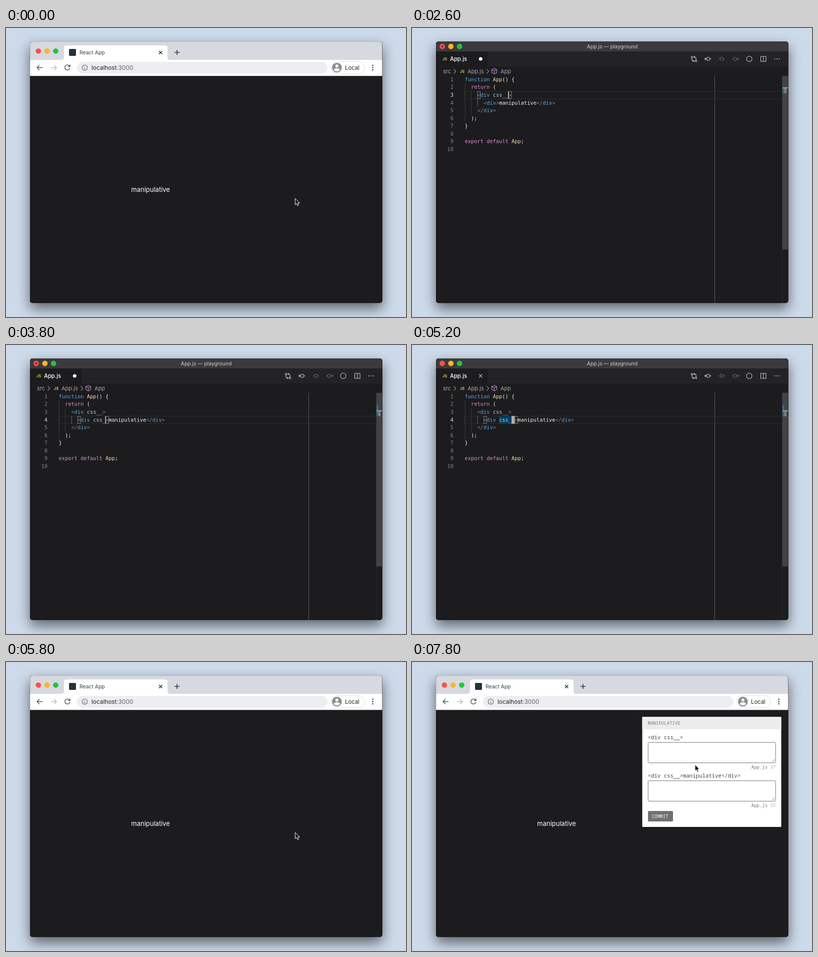
These frames come from a looping animation (800 by 580 pixels, 8000 ms). An HTML page:

```html
<!DOCTYPE html>
<html lang="en">
<head>
<meta charset="utf-8">
<title>Editor and browser</title>
<style>
html, body { margin: 0; width: 100%; height: 100%; overflow: hidden; background: #cddaea; }
svg { display: block; }
text { font-family: Inter, "Open Sans", sans-serif; white-space: pre; }
.code text { font: 10.36px "DejaVu Sans Mono", monospace; }
.panel text { font: 10.67px "Noto Sans Mono", "DejaVu Sans Mono", monospace; }
.panel .small { font-size: 8.6px; letter-spacing: .3px; }
.icon { fill: none; stroke-width: 1.1; }
.shadow { filter: drop-shadow(0 11px 13px rgba(0, 0, 0, .55)); }
.k { fill: #56a8ea; } .p { fill: #d78fd6; } .y { fill: #efdfae; }
.g { fill: #858585; } .a { fill: #9cdcfe; } .w { fill: #f0f0f0; }
</style>
</head>
<body>
<svg width="800" height="580" viewBox="0 0 800 580">
  <defs>
    <clipPath id="frame"><rect x="48" y="27" width="704.5" height="525" rx="5"/></clipPath>
  </defs>
  <rect width="800" height="580" fill="#cddaea"/>
  <rect class="shadow" x="48" y="27" width="704.5" height="525" rx="5" fill="#1c1b1d"/>
  <g clip-path="url(#frame)">
    <rect x="48" y="27" width="705" height="525" fill="#1c1b1d"/>

    <g id="browser">
      <rect x="48" y="27" width="705" height="37" fill="#d6d9df"/>
      <rect x="48" y="64" width="705" height="32" fill="#fff"/>
      <path d="M110 64q6 0 6-6V40q0-5 5-5H318q5 0 5 5V58q0 6 6 6z" fill="#fff"/>
      <g id="browserLights"></g>
      <rect x="126" y="42" width="14" height="14" rx="2" fill="#24333d"/>
      <text x="147" y="52.8" font-size="10.4" fill="#3c4043">React App</text>
      <g class="icon" stroke="#34373a" style="stroke-width:1.5">
        <path d="M306 46l6.4 6.4M312.400 46l-6.400 6.400M342 44v10M337 49h10"/>
        <path d="M73 79.500H62.500M67 74.500l-5 5 5 5" stroke="#55585c"/>
        <path d="M90 79.500h10.500M96 74.500l5 5-5 5" stroke="#b9bbbe"/>
        <path d="M127 76.500a5 5 0 1 0 .7 4M128 73.500v4h-4" stroke="#55585c"/>
      </g>
      <rect x="142" y="68" width="501" height="23.500" rx="11.700" fill="#edeef1"/>
      <g class="icon" stroke="#5f6368">
        <circle cx="157.500" cy="79.500" r="5.300"/><path d="M157.500 78.800v3.700M157.500 76.200v1.400"/>
      </g>
      <text x="171" y="83.700" font-size="11.8" fill="#202124">localhost<tspan fill="#5f6368">:3000</tspan></text>
      <rect x="650" y="67.500" width="67.500" height="24" rx="12" fill="#fff" stroke="#e1e3e6"/>
      <circle cx="661.800" cy="79.500" r="9.800" fill="#8b8e94"/>
      <circle cx="661.800" cy="76.300" r="3" fill="#fff"/>
      <path d="M655.800 84.500q0-3.700 6-3.700t6 3.700q-2.200 2.500-6 2.500t-6-2.500z" fill="#fff"/>
      <text x="678" y="83.600" font-size="11.300" fill="#26282b">Local</text>
      <g fill="#4c4f53">
        <circle cx="733.500" cy="75" r="1.400"/><circle cx="733.500" cy="79.500" r="1.400"/><circle cx="733.500" cy="84" r="1.400"/>
      </g>
      <path d="M48 96H753" stroke="#d8dade" stroke-width=".6"/>
      <text x="250.300" y="329.300" font-size="13" fill="#fff">manipulative</text>
      <g id="panel" class="panel">
        <rect x="460.500" y="110" width="278" height="221" rx="1.500" fill="#fff"/>
        <rect x="460.500" y="110" width="278" height="25" rx="1.500" fill="#ecebed"/>
        <text class="small" x="471.500" y="126" fill="#78777a">MANIPULATIVE</text>
        <g id="fields"></g>
        <rect x="472" y="299" width="50" height="21" rx="1.500" fill="#717173"/>
        <text class="small" x="480" y="313" fill="#fff">COMMIT</text>
      </g>
      <path id="arrow" d="M0 0V12.700L2.900 10 4.900 14.700 7.100 13.700 5.100 9.200H9z" fill="#111" stroke="#fff" stroke-width="1"/>
    </g>

    <g id="editor">
      <rect x="48" y="27" width="705" height="20" fill="#3b3a3c"/>
      <rect x="48" y="47" width="705" height="30" fill="#232224"/>
      <rect x="48" y="47" width="103" height="30" fill="#1c1b1d"/>
      <g id="editorLights"></g>
      <circle id="lightDot" cx="60.500" cy="37" r="1.700" fill="#5c0806"/>
      <text x="400.500" y="40.800" font-size="10.300" text-anchor="middle" fill="#cfcfcf">App.js — playground</text>
      <g font-size="7.500" font-weight="700" fill="#d8c84c">
        <text x="60.800" y="64.700">JS</text><text x="95.800" y="89.700">JS</text>
      </g>
      <text x="76" y="65.800" font-size="11.200" font-weight="500" fill="#fff">App.js</text>
      <path id="close" class="icon" d="M134 58.500l6.500 7M140.500 58.500l-6.500 7" stroke="#e4e4e4"/>
      <circle id="tabDot" cx="137.300" cy="62" r="3.500" fill="#fff"/>
      <g font-size="11" fill="#aaa">
        <text x="62" y="90.800">src</text><text x="111" y="90.800">App.js</text><text x="177" y="90.800">App</text>
      </g>
      <g class="icon" stroke="#aaa">
        <path d="M83.500 82.500l4 4.500-4 4.500M149.500 82.500l4 4.500-4 4.500"/>
        <path d="M164.500 81l5 2.500v6l-5 2.700-5-2.700v-6zM159.500 83.500l5 2.700 5-2.700M164.500 86.200v6" stroke="#b48ad8"/>
      </g>
      <g class="icon" stroke="#c9c9c9">
        <circle cx="560" cy="58.500" r="1.700"/><circle cx="568" cy="66" r="1.700"/>
        <path d="M560 60.200V64q0 2.300 2.300 2.300h2M562.500 64.500l2 1.800-2 1.900M568 64.300V60.500q0-2.300-2.300-2.300h-2M565.500 56.300l-2 1.900 2 1.900"/>
        <circle cx="592.500" cy="62" r="3.200"/><path d="M589.300 62H585.500M587.800 59.700l-2.300 2.300 2.300 2.300M595.700 62h3"/>
        <g stroke="#69686a">
          <circle cx="619.500" cy="62" r="3.200"/><path d="M613 62h3.300M622.700 62h3.300"/>
          <circle cx="646" cy="62" r="3.200"/><path d="M640 62h2.800M649.200 62H654M651.500 59.700l2.300 2.300-2.300 2.300"/>
        </g>
        <circle cx="674.500" cy="62" r="5.500"/>
        <path d="M697.500 57h10.500v10H697.500zM702.800 57v10"/>
      </g>
      <g fill="#d0d0d0"><circle cx="725.500" cy="62" r="1"/><circle cx="730" cy="62" r="1"/><circle cx="734.500" cy="62" r="1"/></g>
      <path d="M605.300 96V552" stroke="#5b5a5c"/>
      <path d="M740.500 96V552" stroke="#2e2d2f"/>
      <rect x="740.500" y="96" width="12" height="348.500" fill="#434244"/>
      <g id="code" class="code"></g>
      <path id="beam" class="icon" d="M574.500 335.500q3 0 3 2.500V346q0 2.500-3 2.500M580.500 335.500q-3 0-3 2.500V346q0 2.500 3 2.500M575.700 342.500h3.600" stroke="#eee"/>
    </g>
  </g>
  <rect x="48.300" y="27.300" width="704" height="524.500" rx="5" fill="none" stroke="#000" stroke-opacity=".25" stroke-width=".6"/>
</svg>
<script>
const CHAR = 6.237, LINE = 15.57, LEFT = 105.5, TOP = 96;
const el = id => document.getElementById(id);
const show = (id, on) => el(id).setAttribute('visibility', on ? 'inherit' : 'hidden');
const colX = c => LEFT + c * CHAR;
const rowY = r => TOP - .3 + r * LINE;
const rect = (x, y, w, h, style) => `<rect x="${x}" y="${y}" width="${w}" height="${h}" ${style}/>`;
const cells = (r, c, n, fill) => rect(colX(c), rowY(r), n * CHAR, LINE, `fill="${fill}"`);
const box = (r, c) => rect(colX(c) + .5, rowY(r) + .8, CHAR - .6, LINE - 1.600,
  'fill="none" stroke="#8d8d8d" stroke-width=".9"');
const esc = s => s.replace(/</g, '&lt;');
const span = (cls, s) => `<tspan class="${cls}">${esc(s)}</tspan>`;

const lights = (x, y) => ['#fc5149', '#fdb427', '#27c33c'].map((c, i) =>
  `<circle cx="${x + i * 17.300}" cy="${y}" r="5.400" fill="${c}"/>`).join('');
el('browserLights').innerHTML = lights(64.800, 46.300);
el('editorLights').innerHTML = lights(60.500, 37);

const field = (y, label, num) => `
  <text x="471.700" y="${y + 4}" fill="#444">${esc(label)}</text>
  <rect x="472.200" y="${y + 10}" width="255" height="41" rx="2" fill="#fff" stroke="#747476"/>
  <path d="M719.500 ${y + 49}l6-6M723 ${y + 49}l2.500-2.500" stroke="#777" stroke-width=".8"/>
  <text class="small" x="727.800" y="${y + 63}" text-anchor="end" fill="#6c6c6e">App.js <tspan fill="#aaa">${num}</tspan></text>`;
el('fields').innerHTML = field(151.300, '<div css__>', 37) + field(228.300, '<div css__>manipulative</div>', 55);

// start time, row, typed attribute, insert mode
const steps = [
  [1400, 2, '', 0], [1800, 2, '', 1], [2000, 2, ' c', 1], [2200, 2, ' css', 1],
  [2400, 2, ' css_', 1], [2600, 2, ' css__', 1], [2800, 2, ' css__', 0],
  [3000, 3, '', 0], [3200, 3, '', 1], [3400, 3, ' c', 1], [3600, 3, ' css', 1],
  [3800, 3, ' css_', 1], [4000, 3, ' css__', 1], [4200, 3, ' css__', 0],
  [4400, 3, ' css__', 0], [5000, 3, ' css__', 0]
];

function codeLines(outer, inner) {
  const open = attr => span('g', '<') + span('k', 'div') + span('a', attr) + span('g', '>');
  const shut = span('g', '</') + span('k', 'div') + span('g', '>');
  return [
    span('k', 'function') + span('y', ' App') + span('w', '() {'),
    span('p', '  return') + span('w', ' ('),
    '    ' + open(outer),
    '      ' + open(inner) + span('w', 'manipulative') + shut,
    '    ' + shut,
    span('w', '  );'),
    span('w', '}'),
    '',
    span('p', 'export default') + span('y', ' App') + span('w', ';'),
    ''
  ];
}

function overview(row, first, changed) {
  const y = 120 + (row - 2) * 12;
  const mark = (x, top, w, h, c) => rect(x, top, w, h, `fill="${c}"`);
  let out = '';
  if (changed) out += mark(741, 120, 3.700, row === 3 ? (changed > 1 ? 23 : 11) : 11, '#24718f');
  out += mark(744.700, y, 4, 11, '#858486');
  if (first) out += mark(744.700, 144, 4, 11, '#858486');
  return out + mark(741, y - .8, 11.500, 1.800, '#a3a2a4');
}

function drawEditor(t) {
  const [start, row, typed, insert] = steps.findLast(s => s[0] <= t);
  const first = start === 1400;
  const openCol = row === 2 ? 4 : 6;
  const endCol = openCol + 4 + typed.length;
  const curCol = insert || !typed ? endCol : endCol - 1;
  const guide = (c, r, n, color) => rect(colX(c) + .2, rowY(r), .9, n * LINE, `fill="${color}"`);

  let out = rect(LEFT, rowY(row) + .4, 635, LINE - .6, 'fill="none" stroke="#302f31" stroke-width="1"');
  out += guide(0, 1, 5, '#403f41') + guide(2, 2, 3, '#403f41') + guide(4, 3, 1, '#777678');
  if (first) out += cells(2, 5, 3, '#49484a') + cells(4, 6, 3, '#49484a');
  if (start >= 4400) out += cells(3, 11, 5, '#043d60');
  if (!insert) out += cells(row, curCol, 1, '#aeafad');
  out += box(row, openCol);
  if (insert || typed) out += box(row, endCol);

  const outer = row === 2 ? typed : ' css__';
  codeLines(outer, row === 3 ? typed : '').forEach((line, i) => {
    const y = rowY(i) + 11.200;
    out += `<text x="83" y="${y}" text-anchor="end" fill="${i === row ? '#e0e0e0' : '#858585'}">${i + 1}</text>`;
    out += `<text x="${LEFT}" y="${y}">${line}</text>`;
  });
  if (insert) out += rect(colX(curCol) - .6, rowY(row) + .5, 1.300, LINE - 1, 'fill="#d5d5d3"');
  out += overview(row, first, row === 2 ? +!!typed : 1 + !!typed);
  el('code').innerHTML = out;

  const dirty = start >= 2000 && start < 5000;
  show('lightDot', dirty);
  show('tabDot', dirty);
  show('close', !dirty);
  show('beam', start < 2000);
}

function draw(t) {
  const editing = t >= 1400 && t < 5600;
  show('editor', editing);
  show('browser', !editing);
  if (editing) return drawEditor(t);
  show('panel', t >= 6600);
  const move = t < 7600 ? 0 : t < 7800 ? .5 : 1;
  el('arrow').setAttribute('transform', `translate(${578.300 - 12.300 * move} ${342 - 136 * move})`);
  el('arrow').setAttribute('fill', '#111');
}

let last = -1;
function tick() {
  const t = Math.floor(performance.now() % 8000 / 200) * 200;
  if (t !== last) draw(last = t);
  requestAnimationFrame(tick);
}
tick();
</script>
</body>
</html>
```
